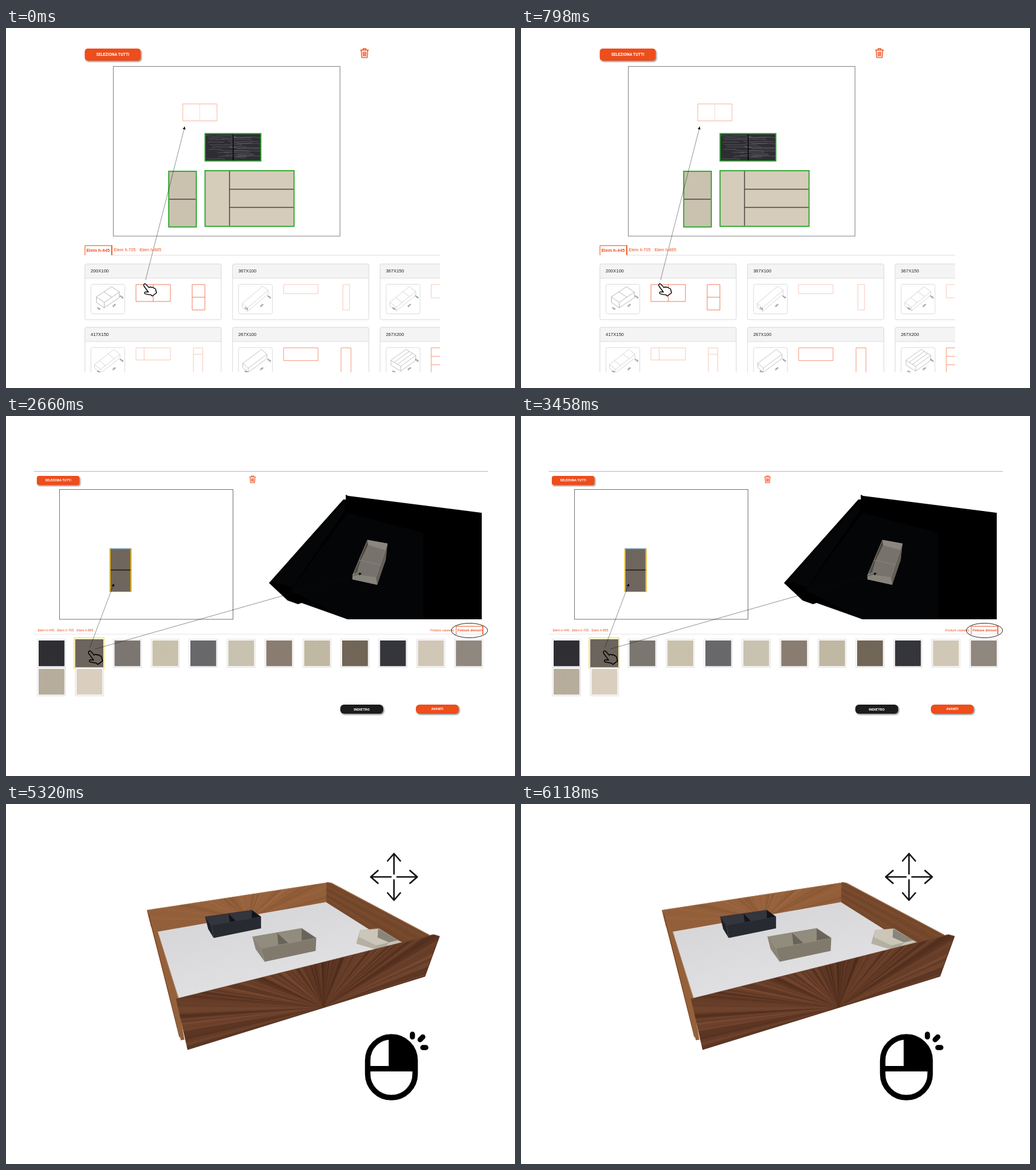
An HTML page that plays this animation: 842 by 595 pixels, repeating every 6.65 s.

```html
<!DOCTYPE html>
<html lang="it">
<head>
<meta charset="utf-8">
<title>Configuratore cassetto</title>
<style>
  html, body { margin: 0; width: 100%; height: 100%; overflow: hidden; background: #fff; }
  svg { display: block; width: 100vw; height: 100vh; }
  text { font-family: "Liberation Sans", Arial, sans-serif; }
  .button { font-family: Roboto, "Liberation Sans", sans-serif; font-weight: 700; text-anchor: middle; fill: #fff; }
</style>
</head>
<body>
<svg id="stage" viewBox="0 0 842 595" xmlns="http://www.w3.org/2000/svg"></svg>
<script>
const STEP = 1330;
const ORANGE = '#ee4d1b', PALE = '#f9c3b1', GREEN = '#2ba52c';

function seeded(seed) {
  return () => (seed = (seed * 16807) % 2147483647) / 2147483647;
}

const repeat = (n, fn) => Array.from({ length: n }, (_, i) => fn(i)).join('');
const rect = (x, y, w, h, attrs = '') => `<rect x="${x}" y="${y}" width="${w}" height="${h}" ${attrs}/>`;
const path = (d, attrs = '') => `<path d="${d}" ${attrs}/>`;
const poly = (points, fill, attrs = '') => `<polygon points="${points}" fill="${fill}" ${attrs}/>`;
const stroke = (color, width = 1) => `fill="none" stroke="${color}" stroke-width="${width}"`;
const text = (s, x, y, size, attrs = '') => `<text x="${x}" y="${y}" font-size="${size}" ${attrs}>${s}</text>`;
const group = (body, attrs = '') => `<g ${attrs}>${body}</g>`;

function button(x, y, w, h, r, label, size, fill = ORANGE) {
  return rect(x, y, w, h, `rx="${r}" fill="${fill}" filter="url(#shadow)"`) +
    text(label, x + w / 2, y + h / 2 + size * .34, size, 'class="button"');
}

function trash(x, y, scale) {
  return group(
    path('M0 3H14M4.6 3V.7H9.4V3M1.6 3.5L2.6 15.4H11.4L12.4 3.5M4.7 5.5L5.1 13.3M7 5.5V13.3M9.3 5.5L8.9 13.3', stroke(ORANGE, 1.4)),
    `transform="translate(${x} ${y}) scale(${scale})"`);
}

function hand(x, y, scale, fill) {
  const d = 'M.8 1C2 -.2 3.5 .2 4.5 1.6L9 6.6C10.5 5 12.4 5.3 13.3 6.4C14.8 5.6 16.5 6.2 17.2 7.6' +
    'C19 7.4 20.3 8.8 20.3 10.8L21.5 15.3L14.5 20.5L12 18.4C9 18.6 5.2 17.3 2.4 16.6C1 15.6 1.7 13.8 3.4 13.6L8 14' +
    'L.7 4C0 2.8 0 1.8 .8 1ZM14.5 20.5L21.5 15.3';
  return group(path(d, `fill="${fill}" stroke="#000" stroke-width="1.4" stroke-linejoin="round"`),
    `transform="translate(${x} ${y}) scale(${scale})"`);
}

function dottedArrow(x1, y1, x2, y2) {
  const angle = Math.atan2(y2 - y1, x2 - x1) * 180 / Math.PI;
  return path(`M${x1} ${y1}L${x2} ${y2}`, stroke('#111', .8) + ' stroke-dasharray="1.3 1"') +
    path('M0 0L-4.5 -2.3V2.3Z', `transform="translate(${x2} ${y2}) rotate(${angle})"`);
}

// Isometric sketch of a tray: left corner, long edge, short edge, height, cross and lengthwise dividers.
function sketch(x, y, color, [px, py], [lx, ly], [sx, sy], h, cross = [], along = []) {
  const at = (u, v, drop = 0) => `${px + lx * u + sx * v} ${py + ly * u + sy * v + drop}`;
  const line = (a, b) => `M${a}L${b}`;
  let d = `M${at(0, 0)}L${at(1, 0)}L${at(1, 1)}L${at(0, 1)}ZL${at(0, 0, h)}L${at(0, 1, h)}L${at(1, 1, h)}L${at(1, 1)}` +
    line(at(0, 1), at(0, 1, h));
  cross.forEach(u => d += line(at(u, 0), at(u, 1)));
  along.forEach(v => d += line(at(0, v), at(1, v)));
  const label = (s, tx, ty, turn) =>
    text(s, 0, 0, 3.7, `font-weight="bold" fill="#555" text-anchor="middle" transform="translate(${tx} ${ty}) rotate(${turn})"`);
  return group(
    rect(0, 0, 56, 49, `rx="3" ${stroke('#d8d8d8', .9)}`) + path(d, stroke(color, .6)) +
    label('100', 12, 41, 35) + label('200', 39, 36, -38) + label('H45', 50, 22, 35),
    `transform="translate(${x} ${y})"`);
}

function card(col, row, title, trayShape, outlines, color, ink = '#bbb') {
  const x = 130.5 + 244.2 * col, y = 390 + 104.7 * row;
  return rect(x, y, 225.5, 92, 'rx="2.5" fill="#fff"') +
    path(`M${x} ${y + 23.5}V${y + 2}Q${x} ${y} ${x + 2} ${y}H${x + 223.5}Q${x + 225.5} ${y} ${x + 225.5} ${y + 2}V${y + 23.5}Z`, 'fill="#f4f4f4"') +
    path(`M${x} ${y + 23.5}h225.5`, stroke('#dedede')) +
    rect(x, y, 225.5, 92, `rx="2.5" ${stroke('#d9d9d9')}`) +
    text(title, x + 9.5, y + 14, 7.5, 'fill="#222"') +
    sketch(x + 10, y + 33.5, ink, ...trayShape) +
    path(outlines, stroke(color, .9) + ` transform="translate(${x + 84.5} ${y + 34})"`);
}

function catalog() {
  const box = (x, w, h) => `M${x} 0h${w}v${h}h${-w}z`;
  const slim = [[6, 32], [34, -29], [9, 7], 6];
  const wide = [[6, 30], [32, -26], [11, 8], 6, [.3, .68]];
  const cards =
    card(0, 0, '200X100', [[9, 21], [25, -17], [13, 9], 9, [.5]], box(0, 57, 28) + 'M28.5 0v28' + box(93, 21, 42) + 'M93 21h21', '#f0714b', '#888') +
    card(1, 0, '367X100', slim, box(0, 57, 15) + box(98, 11, 42), PALE) +
    card(2, 0, '367X150', wide, box(0, 57, 22), PALE) +
    card(0, 1, '417X150', [[6, 28], [32, -25], [10, 8], 6, [.25, .7]], box(0, 57, 20) + 'M13.5 0v20' + box(95, 15.5, 46) + 'M95 10.5h15.5', PALE) +
    card(1, 1, '267X100', [[7, 26], [31, -23], [9, 8], 7], box(0, 57, 21) + box(95, 16.5, 46), '#f3906f', '#999') +
    card(2, 1, '267X200', [[8, 21], [25, -18], [16, 10], 8, [], [.33, .67]], box(0, 57, 46) + 'M0 14h57M0 28h57', '#f3906f', '#999');
  return group(cards, 'clip-path="url(#page)"');
}

function grain(x, y, w, h) {
  const rnd = seeded(41);
  return repeat(26, i => {
    const sx = x + rnd() * w * .6, sy = y + 2 + (i + rnd()) * (h - 4) / 26, bend = rnd() * 5 - 2.5;
    const end = Math.min(18 + rnd() * 40, x + w - sx);
    return path(`M${sx} ${sy}q${end / 4} ${bend} ${end / 2} ${bend / 3}t${end / 2} ${bend / 3}`, stroke('#8e8e92', .4));
  });
}

function planner() {
  const edge = `stroke="${GREEN}" stroke-width="1.8"`;
  return button(130.3, 34, 92.5, 20, 5, 'SELEZIONA TUTTI', 6.6) + trash(586, 33.5, 1) +
    rect(177.5, 63.5, 375, 280.5, stroke('#777', .9)) +
    rect(292.5, 125.5, 56.5, 28, stroke('#f3b29f', .9)) + path('M320.5 125.5v28', stroke('#fbd9cd', .9)) +
    rect(329.3, 174.5, 92.3, 45.3, 'fill="#2e2d33"') + grain(330, 175, 91, 44) +
    path('M375.7 175v45', stroke('#000', 1.3)) + rect(329.3, 174.5, 92.3, 45.3, 'fill="none" ' + edge) +
    rect(269.2, 236.8, 45.6, 92, 'fill="#cac1ae" ' + edge) + path('M270.2 283h43.5', stroke('#4d4849', 1.5)) +
    rect(329.3, 235.8, 147.2, 92, 'fill="#d6ccba" ' + edge) +
    path('M369.7 236.8v90M369.7 266.5h106M369.7 296.5h106', stroke('#4d4849', 1.5)) +
    path('M176 375.5H718', stroke('#ccc', .9) + ' stroke-dasharray="1.5 .8"') +
    path('M130.7 375.5V359.7H175', stroke(ORANGE, 1)) + path('M175 359.2V375.5', stroke(ORANGE, 1.8)) +
    text('Elem h-445', 133, 369.5, 7.3, `fill="${ORANGE}" font-weight="bold"`) +
    text('Elem h-705', 178.5, 369, 7, `fill="${ORANGE}"`) + text('Elem h-885', 221, 369, 7, `fill="${ORANGE}"`) +
    catalog();
}

const dragStart = () => planner() + dottedArrow(231, 416, 295.7, 163) + hand(227.5, 422.5, 1, '#fff');

const dropped = () => group(planner(), 'transform="translate(-22.7 -16.5) scale(1.055)"') +
  '<circle cx="297" cy="116" r="7.8" fill="#16861c"/>' + path('M292.5 116h9M297 111.5v9', stroke('#fff', 2.2));

function swatch(i, color) {
  const x = 54 + 62.75 * (i % 12), y = i < 12 ? 371 : 418;
  if (i === 1) {
    return rect(112.5, 366.5, 50, 50.5, 'fill="#fffbe2" stroke="#f3e28a" stroke-width="1.5"') +
      rect(114.5, 369, 46.5, 46.5, `fill="${color}"`) + rect(114.5, 369, 46.5, 46.5, 'fill="url(#weave)"');
  }
  return rect(x - 2, y - 2, 46.5, 46.5, 'fill="#fff" stroke="#dcdcdc" stroke-width=".9"') +
    rect(x, y, 42.7, 42.5, `fill="${color}"`) + rect(x, y, 42.7, 42.5, `fill="url(#${i ? 'weave' : 'ribs'})"`);
}

function darkDrawer() {
  return poly('562,130 566,132 787,160 787,336 565,336 489,309 483,311 466,305 435,276 558,138 562,138', '#000') +
    poly('565,160 690,193 690,336 565,336 470,288', '#040506') +
    path('M441 273L560 141V158L473 283', 'fill="#050607"') +
    poly('598,205 631,211 628,238 614,279 573,270 574,261', '#77736c') +
    poly('598,205 631,211 629,222 598,213', '#8b877f') +
    poly('598,205 599,213 586,240 584,236', '#4d4640') + poly('583,239 586,240 581,258 575,261', '#524b45') +
    poly('631,211 628,238 614,279 612,266', '#645f59') +
    poly('573,262 612,267 614,279 573,270', '#88847b') +
    path('M574 262L598 205L631 211L612 267ZM585 238l34 8', stroke('#918c83', .7));
}

function finishes() {
  const colors = ['#27272c', '#6f675f', '#7f7973', '#cec5af', '#6b6b6e', '#cdc6b4', '#8d8073', '#c4bca6', '#736859', '#36373d',
    '#d5ccba', '#938a81', '#bab19f', '#dfd4c3'];
  const tab = (s, x, bold) => text(s, x, 355.5, 5.4, `fill="${ORANGE}" ${bold ? 'font-weight="bold"' : ''}`);
  return path('M46 91.5H797', stroke('#b9b9b9')) +
    button(51, 99, 70.5, 15, 3.5, 'SELEZIONA TUTTI', 5.2) + trash(402.5, 98.5, .76) +
    rect(88.5, 121.5, 287, 214.5, stroke('#666', .9)) +
    rect(171.5, 219, 36, 71.5, 'fill="#71685f"') + rect(171.5, 219, 36, 71.5, 'fill="url(#weave)"') +
    path('M172 219V290.5M206.7 219V290.5', stroke('#f3bf10', 1.9)) +
    path('M171 219H207.5', stroke('#9fc0d6', 1.3)) + path('M171 290.5H207.5', stroke('#d9b64a', .9)) +
    path('M173 254.5H206', stroke('#1c1a18', 1.5)) +
    darkDrawer() +
    path('M46 360.5H797', stroke('#e6e6e6', .9)) +
    tab('Elem h-445', 52.5) + tab('Elem h-705', 84.5) + tab('Elem h-885', 117) + tab('Finiture cassetto', 702) +
    path('M744.7 361V347.5H788.5', stroke(ORANGE, .9)) + path('M788.7 347V361', stroke(ORANGE, 1.6)) +
    tab('Finiture divisori', 747, true) +
    '<ellipse cx="766.7" cy="354.5" rx="30" ry="12" fill="none" stroke="#111" stroke-width=".9"/>' +
    colors.map((c, i) => swatch(i, c)).join('') +
    dottedArrow(139, 382, 178.5, 277) + dottedArrow(148, 385, 588.5, 260) +
    hand(136, 388, 1.1, 'none') +
    button(553, 477, 71, 15, 6, 'INDIETRO', 5.9, '#1f1f1f') + button(678, 477, 71, 15, 6, 'AVANTI', 5.7);
}

// Half fan of veneer strips around a centre, turned by tilt.
function rays(cx, cy, radius, count, seed, colors, opacity, tilt = 0) {
  const rnd = seeded(seed), step = Math.PI / count;
  return repeat(count, i => {
    const a = Math.PI + tilt + (i + rnd() * .5) * step, b = a + step * (.35 + rnd() * .6);
    const tip = t => `${cx + radius * Math.cos(t)},${cy + radius * Math.sin(t)}`;
    return poly(`${cx},${cy} ${tip(a)} ${tip(b)}`, colors[Math.floor(rnd() * colors.length)], `opacity="${opacity}"`);
  });
}

// Open two-cell box: rim corners back-left, back-right, front-right, front-left, then the front's bottom corners.
function divider(rim, base, back, [inside, wall, front, side, mid]) {
  const [bl, br, fr, fl] = rim, [baseL, baseR] = base;
  const half = (p, q, k = .5) => [p[0] + (q[0] - p[0]) * k, p[1] + (q[1] - p[1]) * k];
  const top = half(bl, br), low = half(fl, fr);
  return poly(rim.join(' '), inside) +
    poly([bl, br, [br[0], br[1] + back], [bl[0] + 6, bl[1] + back]].join(' '), wall) +
    poly([br, fr, half(fr, fl, .06), [br[0], br[1] + back]].join(' '), mid) +
    poly([top, low, half(low, fl, .05), [top[0] + 2, top[1] + back]].join(' '), mid) +
    poly([bl, fl, baseL, [bl[0] + 5, bl[1] + 20]].join(' '), side) +
    poly([fl, fr, baseR, baseL].join(' '), front) +
    poly([fl, fr, baseR, baseL].join(' '), 'url(#weave)') +
    path(`M${bl}L${br}L${fr}L${fl}ZM${top}L${low}`, stroke(wall, .7));
}

function drawer() {
  const back = '233,176 533,130 528,163 251,211.5 240,204';
  const face = '281,322 705,216 715,219 691,285 300,405.5';
  return poly('251,211 528,163 662,231 286,322', 'url(#floor)') +
    poly(back, '#935f3b') +
    group(rays(400, 192, 190, 38, 17, ['#a87149', '#82502f', '#9c673f'], .4), 'clip-path="url(#back)"') +
    path('M233 176L533 130.5', stroke('#b08560', .8)) +
    poly('233,176 251,211 286,322 283,323 295,389 289,390', '#95613a') +
    path('M236 182L287 385', stroke('#7d4a28', 1.4)) + path('M251 211L285 321', stroke('#c0a086', .8)) +
    poly('529,130 537,131 699,217 694,221 660,246 528,163', '#75482c') +
    repeat(5, i => path(`M529 ${137 + i * 5}L${692 - i * 8} ${221 + i * 4}`, stroke(i % 2 ? '#6a4026' : '#805233', 1))) +
    path('M530 130.5L537 131.5L698 217', stroke('#a67a54', 1.2)) +
    divider([[329, 187], [406, 176], [421, 187], [339, 201]], [[343, 222], [421, 206]], 15, ['#1b1c21', '#34353d', '#292b33', '#202128', '#14151a']) +
    divider([[407, 220], [488, 206], [512, 222], [421, 239]], [[427, 261], [511, 243]], 20, ['#858071', '#928c7e', '#837c6f', '#8b8476', '#69635a']) +
    poly('584,209 615,206 648,226 648,231 612,241 578,231', '#aea99c') +
    poly('584,209 614,207 613,221 632,229 611,234 582,221', '#cbc6b8') +
    poly('614,207 646,225 632,229 613,221', '#8a8579') + poly('581,220 610,234 612,241 578,231', '#b5b0a2') +
    poly('632,229 648,226 656,230 625,238', '#c8c3b5') +
    poly(face, '#633b27') +
    group(rays(524, 336, 300, 72, 29, ['#784a31', '#4c2a1a', '#835338', '#573220', '#6c422c'], .6, -.3) +
      rays(524, 336, 300, 72, 83, ['#784a31', '#4c2a1a', '#6c422c'], .4, .31 - Math.PI * 1.2) +
      rays(524, 336, 300, 72, 57, ['#784a31', '#4c2a1a', '#6c422c'], .4, -.45), 'clip-path="url(#face)"') +
    poly('524,262 560,253 524,336 488,271', '#2c140b', 'opacity=".2"') +
    path('M281 322L705 216.5L715 219', stroke('#7a4f39', .8)) + path('M300 405.5L691 285L715 219', stroke('#4a2c1e', .8));
}

function rotateView() {
  return drawer() +
    path('M659 92A33.8 33.8 0 0 0 651 156.5M627 158.5L651 156.5L648 131M667 157.5A32.6 32.6 0 0 0 676 95M699 88.5L675 94L680 118',
      stroke('#161616', 2.8) + ' stroke-linecap="round" stroke-linejoin="round"') +
    path('M603 348.5C611 357 619 358.5 629 357.5C641 356 651 351.5 661 354C673 357 681 366 682 379', stroke('#000', 1.6) + ' stroke-linecap="round"') +
    path('M680 375V413H647V394Q647 375 666 375ZM674 381H666Q652.5 381 652.5 394V408H674Z', 'fill-rule="evenodd"') +
    path('M685 375H698Q717 375 717 394V413H685Z') +
    path('M647 418H717V454A35 35 0 0 1 647 454Z');
}

function panView() {
  const arrow = a => path('M0 -5V-38M-10.5 -26.5L0 -38.5L10.5 -26.5', `transform="translate(641.8 120.5) rotate(${a})"`);
  return group(drawer(), 'transform="translate(-1.05 -1.5) scale(1.0045 1.005)"') +
    group([0, 90, 180, 270].map(arrow).join(''), stroke('#161616', 2.6) + ' stroke-linecap="round" stroke-linejoin="round"') +
    rect(598.3, 384.7, 78.5, 100.6, `rx="39" ${stroke('#000', 9)}`) +
    path('M633 384H638A39 39 0 0 1 677 424V442H598V433H633Z') +
    path('M672.3 380.5V385M685 389.5L689.5 385M689.5 402.5H694.5', stroke('#000', 8.5) + ' stroke-linecap="round"');
}

const defs = `<defs>
  <filter id="shadow" x="-10%" y="-30%" width="125%" height="180%">
    <feDropShadow dx="1.5" dy="1.8" stdDeviation="1.3" flood-opacity=".45"/>
  </filter>
  <clipPath id="page"><rect x="129" y="380" width="589" height="189"/></clipPath>
  <clipPath id="back"><polygon points="233,176 533,130 528,163 251,211.5 240,204"/></clipPath>
  <clipPath id="face"><polygon points="281,322 705,216 715,219 691,285 300,405.5"/></clipPath>
  <linearGradient id="floor" x2=".6" y2="1"><stop stop-color="#d3d3d6"/><stop offset="1" stop-color="#e3e3e5"/></linearGradient>
  <pattern id="weave" width="3" height="3" patternUnits="userSpaceOnUse">
    <path d="M0 0h1v1h-1zM1.5 1.5h1v1h-1z" fill="#000" opacity=".1"/>
  </pattern>
  <pattern id="ribs" width="4" height="43" patternUnits="userSpaceOnUse">
    <path d="M1 0V43M3 0V43" stroke="#55555c" stroke-width=".6" opacity=".45"/>
  </pattern>
</defs>`;

const stage = document.getElementById('stage');
stage.innerHTML = defs + [dragStart, dropped, finishes, rotateView, panView]
  .map(scene => group(scene(), 'class="scene"')).join('');
const scenes = [...stage.querySelectorAll('.scene')];

function render(ms) {
  const active = Math.floor(ms / STEP) % scenes.length;
  scenes.forEach((scene, i) => scene.style.display = i === active ? '' : 'none');
}

const start = performance.now();
function tick() {
  render(performance.now() - start);
  requestAnimationFrame(tick);
}
tick();
</script>
</body>
</html>
```
